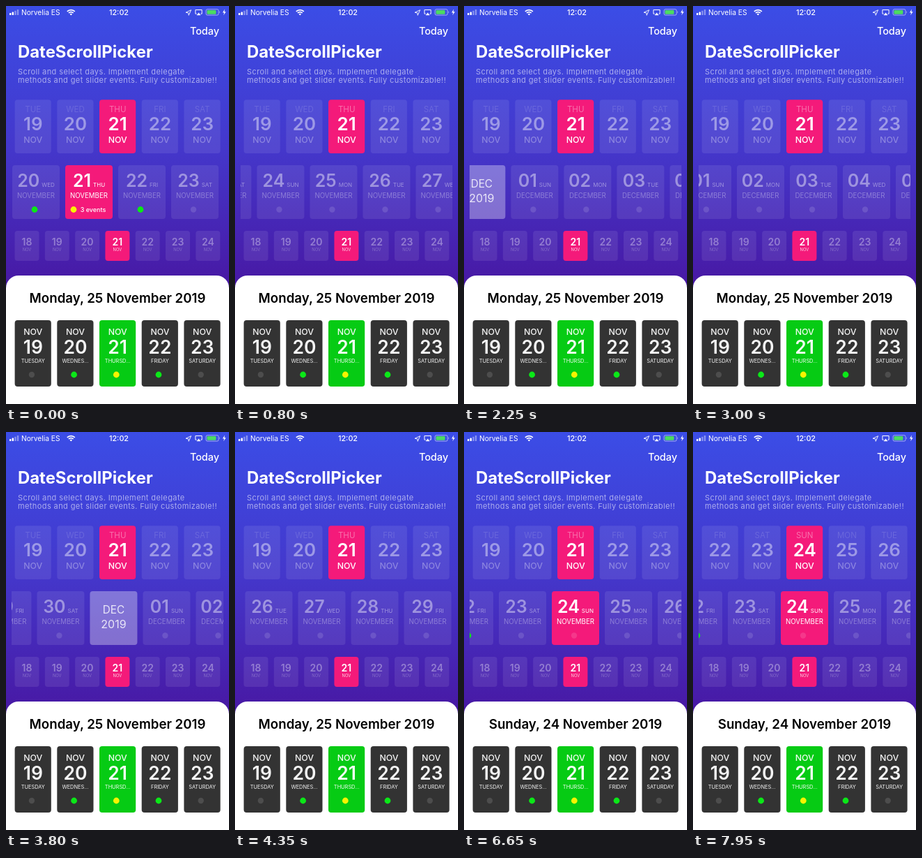
An HTML page that plays this animation: 320 px wide and 570 px high, repeating every 8 s.

```html
<!DOCTYPE html>
<html lang="en">
<head>
<meta charset="utf-8">
<title>Date picker</title>
<style>
  html, body { margin: 0; width: 100%; height: 100%; overflow: hidden; background: #4540d8; }
  svg { display: block; width: 100%; height: 100%; font-family: Inter, "Open Sans", sans-serif; }
  .light { fill: #fff; }
  .cell rect { fill: #fff; fill-opacity: .085; }
  .cell text { fill: #fff; fill-opacity: .33; text-anchor: middle; }
  .cell .num { fill-opacity: .43; }
  .cell .faint { fill-opacity: .14; }
  .small text, .small .num { fill-opacity: .36; }
  .small .faint { fill-opacity: .28; }
  .month rect { fill-opacity: .33; }
  .month text { fill-opacity: .82; }
  .sel rect { fill: #f41a7a; fill-opacity: 1; }
  .sel text, .sel .num { fill-opacity: 1; }
  .sel .faint { fill-opacity: .38; }
  .small.sel .faint { fill-opacity: .8; }
  .dark rect { fill: #333; fill-opacity: 1; }
  .dark text, .dark .num { fill-opacity: .95; }
  .dark.sel rect { fill: #06cb14; }
</style>
</head>
<body>
<svg viewBox="0 0 320 570" preserveAspectRatio="none">
  <defs>
    <linearGradient id="sky" x2="0" y2="1">
      <stop offset="0" stop-color="#3b4de6"/>
      <stop offset=".5" stop-color="#4437cb"/>
      <stop offset="1" stop-color="#4817a2"/>
    </linearGradient>
    <clipPath id="strip"><rect x="8" y="120" width="304" height="260"/></clipPath>
  </defs>
  <rect width="320" height="410" fill="url(#sky)"/>

  <g class="light">
    <rect x="5" y="10" width="2.4" height="3" rx=".6"/>
    <rect x="8.6" y="8.5" width="2.4" height="4.5" rx=".6"/>
    <rect x="12.2" y="6.8" width="2.4" height="6.2" rx=".6" opacity=".4"/>
    <rect x="15.8" y="5" width="2.4" height="8" rx=".6" opacity=".4"/>
    <text x="22" y="12.5" font-size="10.2">Norvelia ES</text>
    <g fill="none" stroke="#fff" stroke-width="1.7">
      <path d="M87.8 7.8a7.8 7.8 0 0 1 11 0M89.9 10a4.8 4.8 0 0 1 6.8 0"/>
    </g>
    <path d="M93.3 13.5l-1.8-2a2.7 2.7 0 0 1 3.6 0z"/>
    <text x="162" y="13" font-size="10.8" font-weight="500" text-anchor="middle">12:02</text>
    <g fill="none" stroke="#fff">
      <path d="M258 9.3l7.6-3.6-3.4 7.6-.5-3.5z" stroke-width=".9"/>
      <path d="M273.5 11.2h-1.6V5.5h9.2v5.7h-1.6"/>
      <rect x="287" y="4.7" width="18" height="8.4" rx="2" stroke-width=".8" stroke-opacity=".65"/>
    </g>
    <path d="M276.5 9.5l3 3.7h-6z"/>
    <rect x="288.4" y="6.1" width="13" height="5.6" rx="1" fill="#4cdb61"/>
    <path d="M306 7.3q1.6 1.6 0 3.2z" opacity=".65"/>
    <path d="M314 4.6l-3.2 4.9h2.3l-.9 3.8 3.4-5h-2.3z"/>
    <text x="306" y="41" font-size="14.4" font-weight="500" text-anchor="end">Today</text>
    <text x="17" y="74.3" font-size="23.9" font-weight="700">DateScrollPicker</text>
    <g font-size="11" letter-spacing=".4" opacity=".56">
      <text x="17" y="98">Scroll and select days. Implement delegate</text>
      <text x="17" y="110.3">methods and get slider events. Fully customizable!!</text>
    </g>
  </g>

  <g clip-path="url(#strip)">
    <g id="weekRow"></g>
    <g id="wideRow"></g>
    <g id="smallRow"></g>
  </g>

  <path d="M0 570V404a18 18 0 0 1 18-18H302a18 18 0 0 1 18 18V570z" fill="#fff"/>
  <text id="heading" x="160" y="425.3" font-size="18.7" font-weight="600" text-anchor="middle"></text>
  <g id="darkRow"></g>
</svg>
<script>
const LOOP = 8000;
const SELECT_WIDE = 5350, SELECT_WEEK = 7600;
const GREEN = '#0be818', YELLOW = '#f8f400';
const $ = id => document.getElementById(id);

const november = day => {
  const date = new Date(2019, 10, day);
  const name = style => date.toLocaleDateString('en-US', style).toUpperCase();
  return {
    num: String(date.getDate()).padStart(2, '0'),
    weekday: name({ weekday: 'long' }),
    month: name({ month: 'long' })
  };
};

const text = (x, y, size, str, weight = 400, cls = '') =>
  `<text x="${x}" y="${y}" font-size="${size}" font-weight="${weight}" class="${cls}">${str}</text>`;

const cell = (x, y, w, h, body, cls = '', day = '') =>
  `<g class="cell ${cls}" data-day="${day}" transform="translate(${x} ${y})">` +
  `<rect width="${w}" height="${h}" rx="4"/>${body}</g>`;

const dot = (x, y, color) => color
  ? `<circle cx="${x}" cy="${y}" r="4.4" fill="${color}"/>`
  : `<circle cx="${x}" cy="${y}" r="4.2" fill="#fff" fill-opacity=".13"/>`;

const eventColor = day => ({ 20: GREEN, 21: YELLOW, 22: GREEN })[day];

const range = (from, to) => Array.from({ length: to - from + 1 }, (_, i) => from + i);
const fill = (id, days, make) => { $(id).innerHTML = days.map(make).join(''); };

fill('weekRow', range(18, 28), day => {
  const d = november(day);
  return cell(12.6 + (day - 19) * 60.7, 134.2, 52.2, 76.8,
    text(26.2, 18, 11.5, d.weekday.slice(0, 3), 400, 'faint') +
    text(26.2, 44.3, 26, d.num, 600, 'num') +
    text(26.2, 62, 12.3, 'NOV', 500), '', day);
});

fill('wideRow', range(20, 36), day => {
  const d = november(day);
  const x = 9 + (day - 20 + (day > 30)) * 76;
  const title = `<text x="34" y="31" font-size="25" font-weight="600" class="num">${d.num}` +
    `<tspan dx="3" font-size="8" font-weight="400">${d.weekday.slice(0, 3)}</tspan></text>`;
  const events = day === 21
    ? dot(12, 63.5, YELLOW) + text(40, 66.7, 9, '3 events', 500)
    : dot(32, 63.5, eventColor(day));
  return cell(x, 228, 68, 77, title + text(34, 46.5, 9.7, d.month) + events, '', day);
});
$('wideRow').innerHTML += cell(9 + 11 * 76, 228, 68, 77,
  text(34, 32, 15.3, 'DEC') + text(34, 53, 16, '2019'), 'month');

fill('smallRow', range(18, 24), day =>
  cell(12.5 + (day - 18) * 43.3, 322, 35, 43,
    text(17.5, 20.5, 14, day, 600, 'num') + text(17.5, 29, 5.8, 'NOV', 400, 'faint'),
    day === 21 ? 'small sel' : 'small'));

fill('darkRow', range(19, 23), day => {
  const { weekday } = november(day);
  const label = day === 20 || day === 21 ? weekday.slice(0, 6) + '...' : weekday;
  return cell(12.6 + (day - 19) * 60.7, 450, 52.2, 95,
    text(26.2, 21, 12.3, 'NOV', 500) + text(26.2, 48, 26.5, day, 600, 'num') +
    text(26.2, 61, 7.4, label) + dot(24.3, 78, eventColor(day)),
    day === 21 ? 'dark sel' : 'dark');
});

// Cubic Hermite through [time, value, slope] keys
const wideKeys = [
  [0, 0, 0], [1600, 682, .3], [2950, 934, 0], [3030, 934, 0],
  [3800, 725, -.42], [5050, 234, 0], [5300, 234, 0], [5680, 187, 0]
];
const weekKeys = [[6850, 0, 0], [7600, 130, .12], [7940, 182.1, 0]];

function track(keys, t) {
  const next = keys.findIndex(k => k[0] > t);
  if (next === 0) return keys[0][1];
  if (next < 0) return keys[keys.length - 1][1];
  const [t0, v0, m0] = keys[next - 1], [t1, v1, m1] = keys[next];
  const span = t1 - t0, u = (t - t0) / span, w = 1 - u;
  return v0 * w * w * (1 + 2 * u) + v1 * u * u * (3 - 2 * u) +
    span * u * w * (m0 * w - m1 * u);
}

const dayCells = id => [...$(id).querySelectorAll('[data-day]')];
const weekCells = dayCells('weekRow'), wideCells = dayCells('wideRow');
const select = (cells, day) =>
  cells.forEach(c => c.classList.toggle('sel', +c.dataset.day === day));
const scroll = (id, offset) => $(id).setAttribute('transform', `translate(${-offset} 0)`);

function render(t) {
  scroll('wideRow', track(wideKeys, t));
  scroll('weekRow', track(weekKeys, t));
  select(wideCells, t < SELECT_WIDE ? 21 : 24);
  select(weekCells, t < SELECT_WEEK ? 21 : 24);
  $('heading').textContent =
    (t < SELECT_WIDE ? 'Monday, 25' : 'Sunday, 24') + ' November 2019';
}

const start = performance.now();
function frame() {
  render((performance.now() - start) % LOOP);
  requestAnimationFrame(frame);
}
frame();
</script>
</body>
</html>
```
